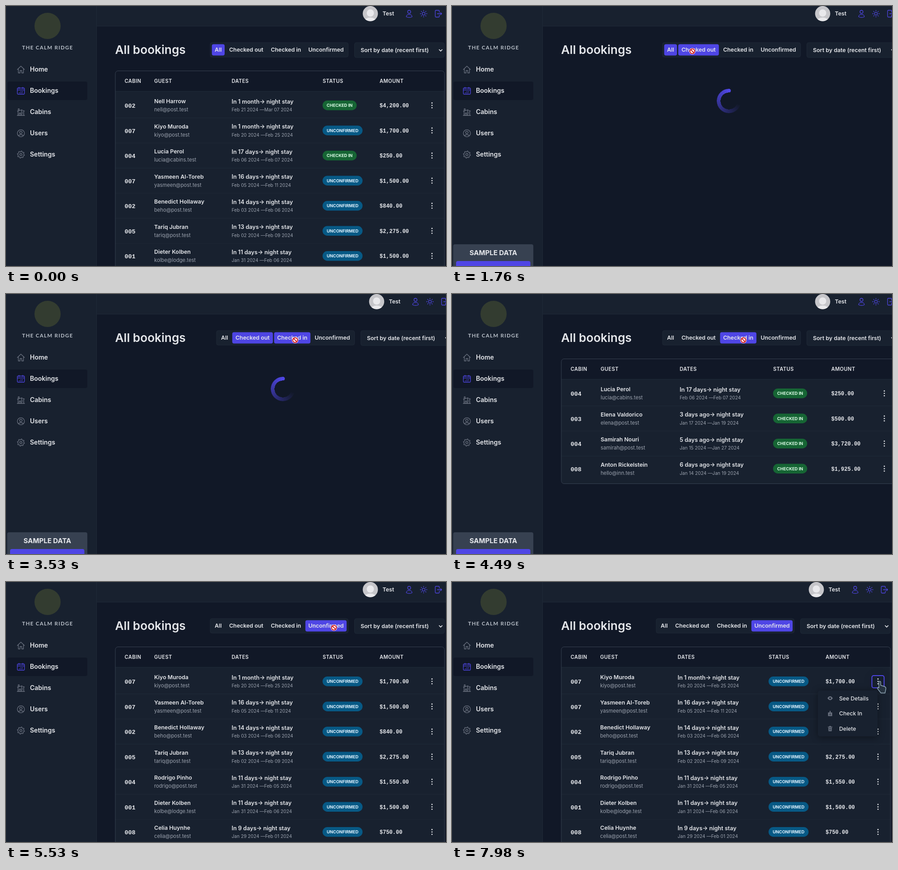
Recreate the animation shown at these times as an HTML page. Size 974 by 575 pixels, loop 8000 ms.

```html
<!DOCTYPE html>
<html lang="en">
<head>
<meta charset="utf-8">
<title>Bookings dashboard</title>
<style>
  html, body { margin: 0; width: 100%; height: 100%; overflow: hidden; background: #111827; }
  svg { display: block; width: 100vw; height: 100vh; }
  text { font-family: Inter, "Open Sans", sans-serif; font-weight: 560; fill: #e5e7eb; white-space: pre; }
  .brand { font-family: Lato, sans-serif; font-weight: 700; letter-spacing: 1.3px; fill: #b9c0c9; }
  .title, .head { font-weight: 600; }
  .head { letter-spacing: .4px; }
  .item { font-weight: 500; }
  .sample, .pill { font-weight: 700; }
  .mail, .date { font-weight: 400; fill: #9ca3af; }
  .cabin, .amount { font-family: "Liberation Mono", monospace; font-weight: 700; }
  .icon { fill: none; stroke: #6b7280; stroke-width: 1.7; stroke-linecap: round; stroke-linejoin: round; }
  .accent { stroke: #4f46e5; }
  #menu > rect { filter: drop-shadow(0 2px 8px rgb(0 0 0 / .4)); }
  #spinner {
    position: absolute; left: 586px; top: 183px; width: 54px; height: 54px; border-radius: 50%;
    background: radial-gradient(farthest-side, #4f46e5 94%, #0000) top / 8.4px 8.4px no-repeat,
      conic-gradient(#0000 30%, #4f46e5);
    mask: radial-gradient(farthest-side, #0000 calc(100% - 8.4px), #000 0);
  }
</style>
</head>
<body>
<svg id="stage" viewBox="0 0 974 575"></svg>
<div id="spinner"></div>
<script>
const LOOP = 8000;
const SIZES = {
  brand: 11.5, nav: 14, title: 26.2, label: 12.4, stay: 12.6, head: 11.1, pill: 9.3, sample: 15,
  mail: 11.2, date: 10.2, cabin: 13.4, amount: 12, item: 12.2
};

const rect = (x, y, w, h, fill, more = '') =>
  `<rect x="${x}" y="${y}" width="${w}" height="${h}" fill="${fill}" ${more}/>`;
const disc = (x, y, r, fill, more = '') => `<circle cx="${x}" cy="${y}" r="${r}" fill="${fill}" ${more}/>`;
const line = (x1, y, x2, color) => rect(x1, y, x2 - x1, 1, color);
// y is the middle of the capitals
const text = (x, y, str, kind, more = '') =>
  `<text x="${x}" y="${y + SIZES[kind] * .36}" font-size="${SIZES[kind]}" class="${kind}" ${more}>${str}</text>`;
const group = (id, body, more = '') => `<g id="${id}" ${more}>${body}</g>`;

const ring = (x, y, r) => `M${x - r} ${y}a${r} ${r} 0 1 0 ${2 * r} 0a${r} ${r} 0 1 0 ${-2 * r} 0`;
const gear = 'M' + Array.from({ length: 32 }, (_, i) => {
  const r = i % 4 < 2 ? 10.5 : 8, a = (i + .5) * Math.PI / 16;
  return `${(12 + r * Math.cos(a)).toFixed(1)} ${(12 + r * Math.sin(a)).toFixed(1)}`;
}).join('L') + 'Z' + ring(12, 12, 3.3);
const ICONS = {
  home: 'M1.5 12L12 2l10.5 10M4.5 10v12h5v-7h5v7h5V10',
  calendar: 'M3 4h18q1.5 0 1.5 1.5V20q0 2-2 2h-17q-2 0-2-2V5.5Q1.5 4 3 4M1.5 9.5h21M6.5 1.5v4M17.5 1.5v4M7 18h1M11 18h1M11 14.5h1M15 14.5h2M15 18h1',
  cabin: 'M1 22h22M3.5 22V9M14 22V7M20.5 22V8M1.5 9.5L15 5.5M14 6l8.5 3M4 7V2.5h3V7M7 22v-7h4v7M17 12v1M17 16v1',
  users: ring(12, 12, 10.5) + ring(12, 9.5, 3.6) + 'M5 19.5c3-5 11-5 14 0',
  gear,
  user: ring(12, 6.5, 4.5) + 'M3.5 21c0-9 17-9 17 0c-5 2.5-12 2.5-17 0z',
  sun: ring(12, 12, 4.2) + 'M12 2v2M12 20v2M2 12h2M20 12h2M5 5l1.3 1.3M17.7 17.7l1.3 1.3M5 19l1.3-1.3M17.7 6.3l1.3-1.3',
  logout: 'M15 8V4q0-2-2-2H5Q3 2 3 4v16q0 2 2 2h8q2 0 2-2v-4M9 12h13l-3.5-3.5M22 12l-3.5 3.5'
};
const icon = (name, x, y, more = '') =>
  `<path class="icon ${more}" d="${ICONS[name]}" transform="translate(${x - 9} ${y - 9}) scale(.75)"/>`;

const STATUS = {
  in: ['CHECKED IN', 75, '#166534', '#dcfce7'],
  new: ['UNCONFIRMED', 88, '#075985', '#e0f2fe'],
  out: ['CHECKED OUT', 85, '#374151', '#f3f4f6']
};
const BOOKINGS = [
  '002|Nell Harrow|nell@post.test|In 1 month|Feb 21 2024 —Mar 07 2024|in|$4,200.00',
  '007|Kiyo Muroda|kiyo@post.test|In 1 month|Feb 20 2024 —Feb 25 2024|new|$1,700.00',
  '004|Lucia Perol|lucia@cabins.test|In 17 days|Feb 06 2024 —Feb 07 2024|in|$250.00',
  '007|Yasmeen Al-Toreb|yasmeen@post.test|In 16 days|Feb 05 2024 —Feb 11 2024|new|$1,500.00',
  '002|Benedict Hollaway|beho@post.test|In 14 days|Feb 03 2024 —Feb 06 2024|new|$840.00',
  '005|Tariq Jubran|tariq@post.test|In 13 days|Feb 02 2024 —Feb 09 2024|new|$2,275.00',
  '001|Dieter Kolben|kolbe@lodge.test|In 11 days|Jan 31 2024 —Feb 06 2024|new|$1,500.00',
  '004|Rodrigo Pinho|rodrigo@post.test|In 11 days|Jan 31 2024 —Feb 05 2024|new|$1,550.00',
  '008|Celia Huynhe|celia@post.test|In 9 days|Jan 29 2024 —Feb 01 2024|new|$750.00',
  '006|Suresh Nandi|suresh@post.test|5 days ago|Jan 15 2024 —Jan 18 2024|out|$1,020.00',
  '005|Walt Roe|waltroe@post.test|7 days ago|Jan 13 2024 —Jan 15 2024|out|$620.00',
  '003|Bo Yun|bo.yun@letter.test|15 days ago|Jan 05 2024 —Jan 08 2024|out|$930.00',
  '006|Odile Garnet|odile@post.test|17 days ago|Jan 03 2024 —Jan 10 2024|out|$2,170.00',
  '001|Torsten Lindqvale|torsten@cabins.test|24 days ago|Dec 27 2023 —Jan 06 2024|out|$2,800.00',
  '003|Suleiman Qar|suleimanqar@mail.test|26 days ago|Dec 25 2023 —Dec 30 2023|out|$1,550.00',
  '002|Edvin Halstrom|halstrom@cabins.test|2 months ago|Dec 05 2023 —Dec 21 2023|out|$4,000.00',
  '003|Elena Valdorico|elena@post.test|3 days ago|Jan 17 2024 —Jan 19 2024|in|$500.00',
  '004|Samirah Nouri|samirah@post.test|5 days ago|Jan 15 2024 —Jan 27 2024|in|$3,720.00',
  '008|Anton Rickelstein|hello@inn.test|6 days ago|Jan 14 2024 —Jan 19 2024|in|$1,925.00'
].map(row => row.split('|'));

const NARROW = { right: 970.5, cols: [262.5, 328, 499.5, 701, 827, 943] };
const WIDE = { right: 984.5, cols: [262.5, 329, 504, 711, 839.5, 957] };

function bookingRow([cabin, guest, mail, when, dates, status, amount], y, cols) {
  const [xCabin, xGuest, xDates, xStatus, xAmount, xDots] = cols;
  const [label, width, fill, ink] = STATUS[status];
  return text(xCabin, y + .7, cabin, 'cabin') +
    text(xGuest, y - 8.8, guest, 'label') + text(xGuest, y + 9.6, mail, 'mail') +
    text(xDates, y - 8.8, when + '→ night stay', 'stay') + text(xDates, y + 9.6, dates, 'date') +
    rect(xStatus - .3, y - 10.7, width + .6, 21.4, fill, 'rx="10.7"') +
    text(xStatus + width / 2, y, label, 'pill', `text-anchor="middle" style="fill:${ink}"`) +
    text(xAmount, y, amount, 'amount') +
    [-5.3, 0, 5.3].map(d => disc(xDots, y + d, 1.4, '#e5e7eb')).join('');
}

function table(id, { right, cols }, picks) {
  const width = right - 242, height = 54 + 55.5 * picks.length;
  const rows = picks.map((pick, i) =>
    bookingRow(BOOKINGS[pick], 219.8 + 55.5 * i, cols) +
    (i < picks.length - 1 ? line(242, 247 + 55.5 * i, right, '#1f2937') : ''));
  return group(id,
    rect(242, 143.5, width, height, '#18212f', 'rx="6"') +
    `<path d="M242 188.5V149.5q0-6 6-6H${right - 6}q6 0 6 6V188.5z" fill="#111827"/>` +
    line(242, 188, right, '#1f2937') +
    ['CABIN', 'GUEST', 'DATES', 'STATUS', 'AMOUNT'].map((h, i) => text(cols[i], 166, h, 'head')).join('') +
    rows.join('') +
    rect(242, 143.5, width, height, 'none', 'rx="6" stroke="#374151"'));
}

const NAV = ['Home', 'Bookings', 'Cabins', 'Users', 'Settings'];
const NAV_ICONS = ['home', 'calendar', 'cabin', 'users', 'gear'];
const sidebar = rect(0, 0, 200, 575, '#18212f') + rect(200, 0, 1, 575, '#1f2937') +
  disc(92, 44, 29, '#333c30') +
  text(92, 91.5, 'THE CALM RIDGE', 'brand', 'text-anchor="middle"') +
  rect(3, 167, 177, 41, '#111827', 'rx="4"') +
  NAV.map((name, i) => icon(NAV_ICONS[i], 33, 140.5 + 47 * i, i === 1 ? 'accent' : '') +
    text(53, 140.3 + 47 * i, name, 'nav')).join('') +
  group('sample', rect(2.5, 527, 177.5, 60, '#374151', 'rx="4"') +
    text(91.5, 545.5, 'SAMPLE DATA', 'sample', 'text-anchor="middle"') +
    rect(9, 564, 164.5, 30, '#4f46e5', 'rx="4"'));

const FILTERS = [['all', 'All', 455.7, 28.3], ['out', 'Checked out', 486.8, 90],
  ['in', 'Checked in', 579.4, 80.5], ['new', 'Unconfirmed', 662.7, 91.3]];
const toolbar = group('toolbar',
  `<clipPath id="round"><circle cx="806.5" cy="16.8" r="16.8"/></clipPath>` +
  `<g clip-path="url(#round)">${rect(789, 0, 35, 35, '#c6c6ca')}${disc(806.5, 15.5, 8, '#e9e9ec')}` +
  `<ellipse cx="806.5" cy="33" rx="13" ry="7.5" fill="#e9e9ec"/></g>` +
  text(833.5, 17, 'Test', 'label') +
  icon('user', 892.5, 17, 'accent') + icon('sun', 924.5, 17, 'accent') + icon('logout', 957, 17, 'accent') +
  rect(452, 81, 305.5, 32, '#18212f', 'rx="4" stroke="#1f2937"') +
  FILTERS.map(([id, label, x, w]) => rect(x, 84.6, w, 24.8, '#4f46e5', `rx="4" id="pick-${id}"`) +
    text(x + w / 2, 97, label, 'label', 'text-anchor="middle"')).join('') +
  rect(771.5, 81, 199, 33, '#18212f', 'rx="4" stroke="#1f2937"') +
  text(785, 97.5, 'Sort by date (recent first)', 'label') +
  `<path d="M958.5 96l3.7 3.7 3.7-3.7" fill="none" stroke="#e5e7eb" stroke-width="1.7"/>`);

const menu = group('menu',
  rect(929.5, 207, 27, 27, 'none', 'rx="4" stroke="#4f46e5" stroke-width="2"') +
  rect(810, 240, 132, 101.5, '#18212f', 'rx="5"') +
  '<path d="M831 257q6-8.5 12 0q-6 8.5-12 0z" fill="#6b7280"/>' + disc(837, 257, 2, '#18212f') +
  '<path d="M832.5 288.5h9v8h-9zM836 285h2v4h-2z" fill="#6b7280"/>' +
  '<path d="M837 290v4m-2-1.5l2 2 2-2" fill="none" stroke="#18212f"/>' +
  '<path d="M832 320h10v1.5h-10zM835 318.5h4v1.5h-4zM833 322.5h8l-.6 7.5h-6.8z" fill="#6b7280"/>' +
  '<path d="M835.7 324v4.5M838.3 324v4.5" stroke="#18212f"/>' +
  ['See Details', 'Check In', 'Delete'].map((s, i) => text(857, 257.3 + 33.5 * i, s, 'item')).join(''));

const POINTER = 'fill="#26323f" stroke="#93a9b8" stroke-width="1.4" stroke-linejoin="round"';
const cursor = group('cursor',
  `<path id="arrow" d="M.5 .7V21.5l4.5-4L9 26.3l3.6-1.6L8.8 16.4l5.7-.6z" ${POINTER}/>` +
  `<path id="hand" d="M-2 1q2-3 4 0v7.5l8 2.5q4 1.5 3.5 5l-2 9.5h-9l-7.5-9.5q-.5-3 2-3l1 1.5z" ${POINTER}/>` +
  group('banned', disc(0, 0, 7, '#fff') + disc(0, 0, 5.3, '#fff', 'stroke="#d01c1f" stroke-width="2"') +
    '<path d="M-3.7-3.7L3.7 3.7" stroke="#d01c1f" stroke-width="2"/>'));

document.getElementById('stage').innerHTML =
  rect(0, 0, 974, 575, '#111827') + rect(201, 0, 773, 44, '#18212f') + line(201, 44, 974, '#1f2937') +
  sidebar + text(241.5, 97, 'All bookings', 'title') + toolbar +
  table('table-all', NARROW, [0, 1, 2, 3, 4, 5, 6]) +
  table('table-out', WIDE, [9, 10, 11, 12, 13, 14, 15]) +
  table('table-in', WIDE, [2, 16, 17, 18]) +
  table('table-new', NARROW, [1, 3, 4, 5, 7, 6, 8]) +
  menu + cursor;

const sheet = document.head.appendChild(document.createElement('style'));
let count = 0;

// frames: [ms, value] pairs on the shared loop
function animate(id, prop, frames, easing = 'linear') {
  const name = 'a' + count++;
  const all = [[0, frames[0][1]], ...frames, [LOOP, frames.at(-1)[1]]];
  sheet.append(`@keyframes ${name}{${all.map(([ms, v]) => `${ms / LOOP * 100}%{${prop}:${v}}`).join('')}}\n`);
  const { style } = document.getElementById(id);
  style.animation = [style.animation, `${name} ${LOOP}ms ${easing} infinite`].filter(Boolean).join();
}
const show = (id, ...spans) => animate(id, 'opacity',
  [[0, 0], ...spans.flatMap(([from, to]) => [[from, 1], [to, 0]])].filter(([ms]) => ms < LOOP), 'step-end');

const CLICK = { out: 1760, in: 3530, new: 5260 };
const READY = { out: 2110, in: 3950, new: 5530 };
const FADE = 250;

show('table-all', [0, CLICK.out]);
show('table-out', [READY.out, CLICK.in]);
show('table-in', [READY.in, CLICK.new]);
show('table-new', [READY.new, LOOP]);
show('sample', [CLICK.out, READY.new]);
show('menu', [7700, LOOP]);
animate('toolbar', 'translate', [[0, '0px'], [CLICK.out, '14px'], [READY.new, '0px']], 'step-end');

const waits = Object.keys(CLICK).map(key => [CLICK[key], READY[key]]);
show('spinner', ...waits);
animate('spinner', 'rotate', [[0, '0deg'], ...waits.flatMap(([from, to]) =>
  [[from - 1, '0deg'], [from, '0deg'], [to, (to - from) * .24 + 'deg'], [to + 1, '0deg']])]);

const highlight = (id, hover, leave) => animate('pick-' + id, 'opacity', [
  ...(hover ? [[hover, 0], [hover + FADE, 1]] : [[0, 1]]),
  ...(leave ? [[leave, 1], [leave + FADE, 0]] : [])]);
highlight('all', 0, CLICK.out);
highlight('out', 1390, CLICK.in);
highlight('in', 2900, CLICK.new);
highlight('new', 4780, 0);

show('arrow', [920, 1480], [6780, 7500]);
show('hand', [1480, CLICK.out], [2900, CLICK.in], [4780, CLICK.new], [7500, LOOP]);
show('banned', [CLICK.out, 2900], [CLICK.in, 4780], [CLICK.new, 6780]);
animate('cursor', 'translate', [
  [920, 853, 402], [1060, 725, 288], [1200, 595, 176], [1340, 537, 125], [1480, 533, 107], [1690, 532, 100],
  [2370, 532, 100], [2440, 538, 99], [2710, 538, 99], [2800, 555, 102], [2900, 600, 104], [3060, 631, 104],
  [3200, 640, 102], [3530, 640, 102], [3600, 645, 102], [4490, 645, 102], [4700, 664, 101], [4900, 699, 100],
  [5100, 713, 98], [5260, 717, 97], [5330, 717, 97], [5530, 726, 101], [6660, 726, 101], [6800, 738, 112],
  [7000, 800, 153], [7200, 872, 195], [7430, 929, 219], [7600, 947, 220]
].map(([ms, x, y]) => [ms, `${x}px ${y}px`]));
</script>
</body>
</html>
```
